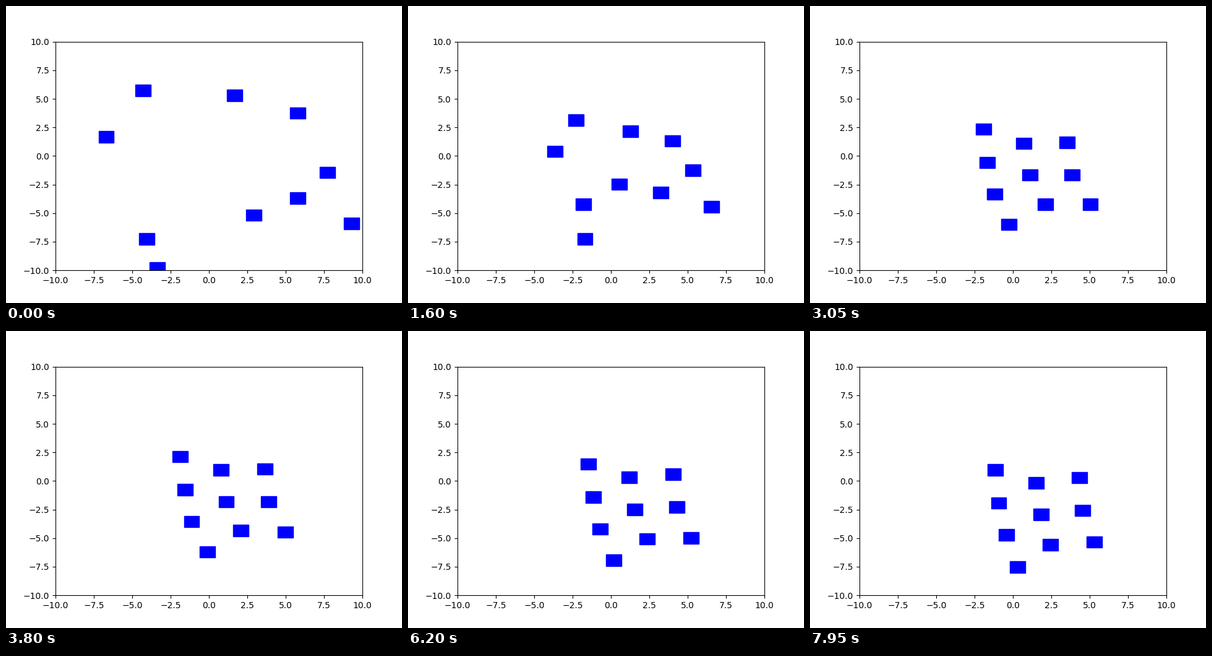
Recreate the animation shown at these times as a matplotlib script. Size 640x480 px, loop 8 s.

```python
import numpy as np
import matplotlib.pyplot as plt
from matplotlib.animation import FuncAnimation
from matplotlib.patches import Rectangle

FRAMES, INTERVAL = 160, 50
SPEED = 0.1       # pull towards the middle of the flock, per frame
REACH = 3.0       # squares closer than this push each other away
STIFFNESS = 0.5

START = np.array([
    (-4.29, 5.73), (1.67, 5.30), (5.79, 3.75), (-6.69, 1.67), (2.92, -5.17),
    (5.79, -3.69), (7.72, -1.44), (-3.37, -9.80), (-4.05, -7.26), (9.29, -5.90),
])

# Slow drift of the flock's middle
DRIFT_T = [0, 18, 48, 76, 124, 159]
DRIFT_X = [1.478, 1.216, 1.083, 1.184, 1.548, 1.774]
DRIFT_Y = [-1.680, -1.616, -1.550, -1.878, -2.497, -2.949]


def unit(v):
    length = np.linalg.norm(v)
    return v / length if length > 0 else v


def step(pos):
    """Move the squares one after another: cohesion plus separation."""
    for i in range(len(pos)):
        gap = pos[i] - pos
        dist = np.linalg.norm(gap, axis=1)
        near = (dist > 0) & (dist < REACH)
        push = STIFFNESS * (REACH / dist[near] - 1) @ gap[near]
        pos[i] += SPEED * unit(pos.mean(axis=0) - pos[i]) + push


def simulate():
    pos = START.copy()
    track = []
    for frame in range(FRAMES):
        middle = [np.interp(frame, DRIFT_T, d) for d in (DRIFT_X, DRIFT_Y)]
        track.append(pos - pos.mean(axis=0) + middle)
        step(pos)
    return track


track = simulate()

fig, ax = plt.subplots(figsize=(6.4, 4.8), dpi=100)
ax.set_xlim(-10, 10)
ax.set_ylim(-10, 10)
squares = [ax.add_patch(Rectangle((0, 0), 1, 1, color="blue")) for _ in START]


def update(frame):
    for square, (x, y) in zip(squares, track[frame]):
        square.set_xy((x - 0.5, y - 0.5))
    return squares


update(0)
anim = FuncAnimation(fig, update, frames=FRAMES, interval=INTERVAL,
                     init_func=lambda: update(0), repeat=True, repeat_delay=0)
plt.show()
```
